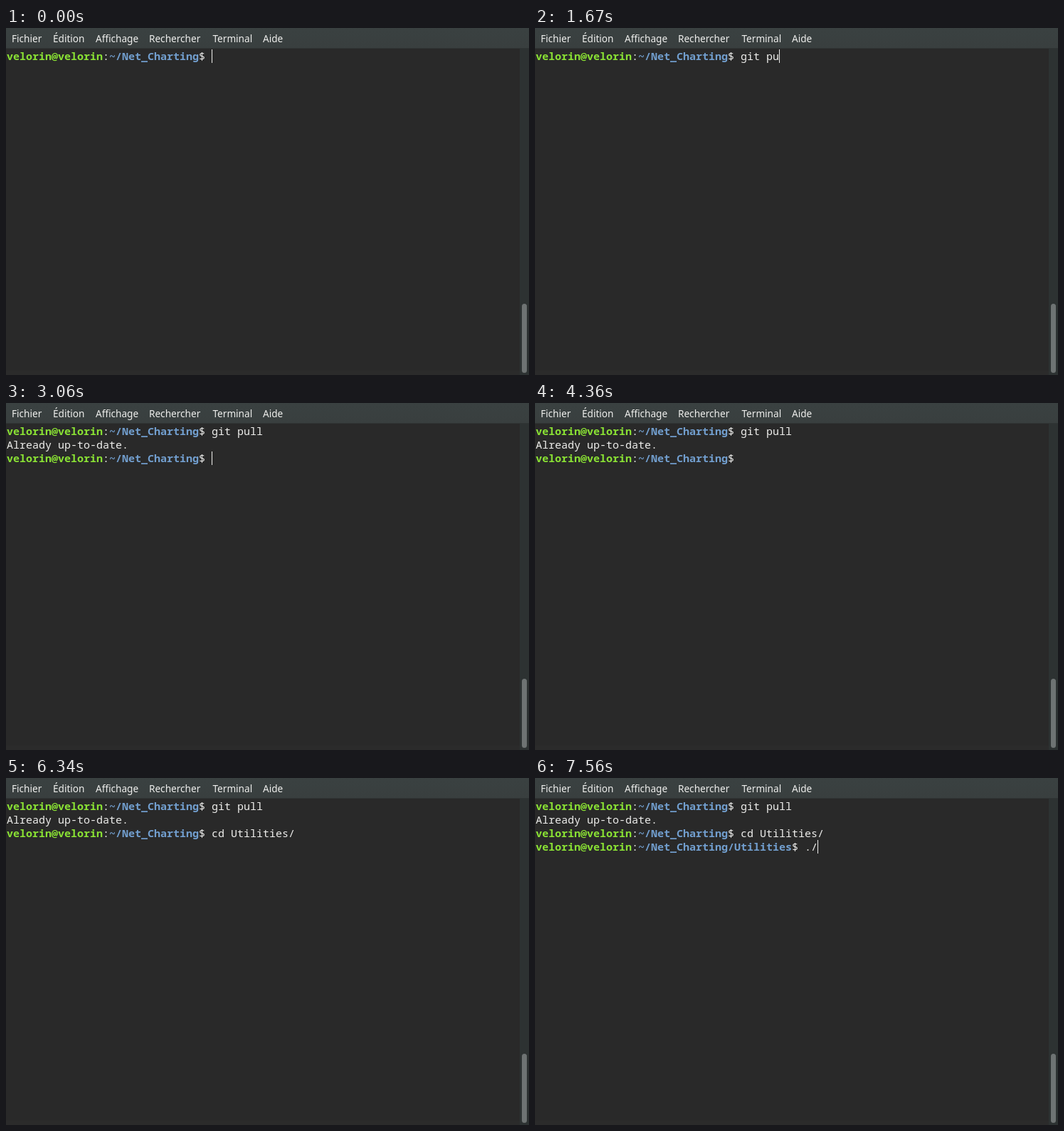
An HTML page that plays this animation: 735x487 px, repeating every 8000 ms.

```html
<!DOCTYPE html>
<html lang="fr">
<head>
<meta charset="utf-8">
<title>Terminal</title>
<style>
  html, body { margin: 0; width: 100%; height: 100%; overflow: hidden; background: #292929; }
  svg { display: block; width: 735px; height: 487px; }
  text { white-space: pre; }
  .menu { font: 13.6px "Noto Sans", "Open Sans", sans-serif; fill: #eeeeec; }
  .term { font: 15px "Noto Sans Mono", "Liberation Mono", monospace; fill: #eeeeec; }
  .user, .path { font-weight: 700; }
  .user { fill: #8ae234; }
  .path { fill: #729fcf; }
</style>
</head>
<body>
<svg viewBox="0 0 735 487">
  <defs>
    <linearGradient id="bar" x2="0" y2="1">
      <stop stop-color="#3a4141"/>
      <stop offset="1" stop-color="#393f3f"/>
    </linearGradient>
  </defs>
  <rect width="735" height="487" fill="#292929"/>
  <rect width="735" height="28" fill="url(#bar)"/>
  <rect x="722" y="28" width="13" height="459" fill="#2d3232"/>
  <rect y="28" width="735" height="1" fill="#303535"/>
  <rect y="481" width="722" height="6" fill="#2b2b2b"/>
  <rect x="725" y="387" width="7" height="97" rx="3.5" fill="#6e7373"/>
  <g class="menu">
    <text x="8" y="20">Fichier</text>
    <text x="66" y="20">Édition</text>
    <text x="126" y="20">Affichage</text>
    <text x="201" y="20">Rechercher</text>
    <text x="290.5" y="20">Terminal</text>
    <text x="361" y="20">Aide</text>
  </g>
  <g class="term" id="term"></g>
  <rect id="caret" width="1" height="19" fill="#eeeeec"/>
</svg>
<script>
  const LOOP = 8000, CELL = 9, ROW = 19, LEFT = 1, TOP = 30;
  const user = 'velorin@velorin', home = '~/Net_Charting';
  // Working directory of each line; null means plain output
  const dirs = [home, null, home, home + '/Utilities'];

  // [time, line, text after the prompt, caret shown]
  const steps = [
    [0, 0, '', 1],
    [1110, 0, 'g', 1], [1200, 0, 'gi', 1], [1290, 0, 'git', 1], [1380, 0, 'git ', 1],
    [1550, 0, 'git p', 1], [1670, 0, 'git pu', 1], [1900, 0, 'git pul', 1], [2050, 0, 'git pull', 1],
    [2560, 1, '', 1],
    [3060, 1, 'Already up-to-date.', 0], [3060, 2, '', 1],
    [3170, 2, '', 0], [3770, 2, '', 1], [4360, 2, '', 0],
    [4510, 2, 'c', 1], [4670, 2, 'cd', 1], [4760, 2, 'cd ', 1], [4960, 2, 'cd U', 1],
    [5160, 2, 'cd Ut', 1], [5250, 2, 'cd Uti', 1], [5420, 2, 'cd Util', 1], [5500, 2, 'cd Utili', 1],
    [5720, 2, 'cd Utilities/', 1],
    [6340, 2, 'cd Utilities/', 0], [6380, 3, '', 0], [6420, 3, '', 1],
    [6990, 3, '', 0], [7250, 3, '', 1], [7320, 3, '.', 1], [7560, 3, './', 1]
  ];

  const term = document.getElementById('term');
  const caret = document.getElementById('caret');
  const make = (tag, parent) =>
    parent.appendChild(document.createElementNS('http://www.w3.org/2000/svg', tag));

  function addText(parent, col, row, str, cls) {
    const el = make('text', parent);
    el.setAttribute('x', LEFT + col * CELL);
    el.setAttribute('y', TOP + row * ROW + 15);
    if (cls) el.setAttribute('class', cls);
    el.textContent = str;
    return el;
  }

  const lines = dirs.map((dir, row) => {
    const group = make('g', term);
    let col = 0;
    if (dir) {
      for (const [str, cls] of [[user, 'user'], [':'], [dir, 'path'], ['$ ']]) {
        addText(group, col, row, str, cls);
        col += str.length;
      }
    }
    return { group, col, input: addText(group, col, row, '') };
  });

  let shown = -1;
  function draw(time) {
    let last = 0;
    while (last + 1 < steps.length && steps[last + 1][0] <= time) last++;
    if (last === shown) return;
    shown = last;

    const texts = [];
    for (const [, row, text] of steps.slice(0, last + 1)) texts[row] = text;
    lines.forEach(({ group, input }, row) => {
      group.style.display = row in texts ? '' : 'none';
      input.textContent = texts[row] || '';
    });

    const [, row, text, on] = steps[last];
    caret.setAttribute('x', LEFT + (lines[row].col + text.length) * CELL);
    caret.setAttribute('y', TOP + row * ROW);
    caret.style.display = on ? '' : 'none';
  }

  const start = performance.now();
  function tick() {
    draw((performance.now() - start) % LOOP);
    requestAnimationFrame(tick);
  }
  tick();
</script>
</body>
</html>
```
